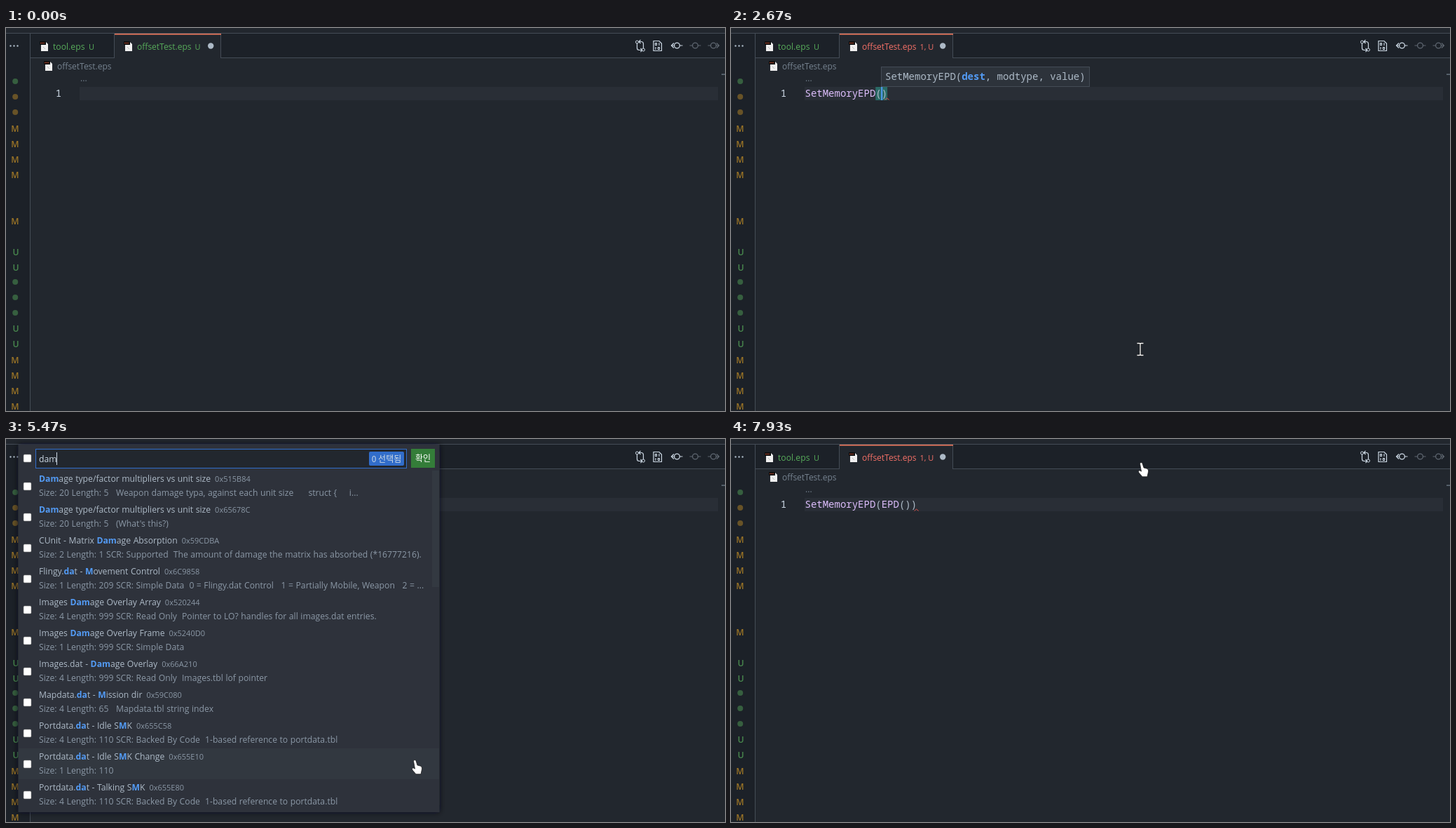
Animation, 1026 px wide and 546 px high, one loop 8000 ms. Source, as an HTML page:

```html
<!DOCTYPE html>
<html lang="en">
<head>
<meta charset="utf-8">
<title>Editor offset picker</title>
<style>
html, body { margin: 0; width: 100%; height: 100%; overflow: hidden; background: #22272e; }
svg { display: block; width: 1026px; height: 546px; }
text { white-space: pre; }
.ui { font: 12.2px "Open Sans", "Noto Sans", sans-serif; word-spacing: .36px; }
.tab { font: 12px "Open Sans", "Noto Sans", sans-serif; }
.small { font: 11px "Open Sans", "Noto Sans", sans-serif; }
.kr { font: 12px "Noto Sans CJK KR", "Noto Sans CJK", "Noto Sans", sans-serif; }
.code { font: 14px "Noto Sans Mono", "DejaVu Sans Mono", monospace; }
.hit { font-weight: 700; fill: #539bf5; }
</style>
</head>
<body>
<svg id="stage" viewBox="0 0 1026 546" xmlns="http://www.w3.org/2000/svg"></svg>
<script>
const LOOP = 8000, STEP = 200 / 3;
const CODE_X = 105.5, CHAR = 8.4;
const C = {
  bg: '#22272e', side: '#1c2128', panel: '#2d333b', border: '#444c56', text: '#adbac7',
  bright: '#cdd9e5', dim: '#768390', note: '#8b98a6', blue: '#539bf5', green: '#57ab5a', red: '#e5534b',
  error: '#f47067', amber: '#c69026', purple: '#b083f0', func: '#dcbdfb'
};

const rect = (x, y, w, h, fill, more = '') =>
  `<rect x="${x}" y="${y}" width="${w}" height="${h}" fill="${fill}" ${more}/>`;
const text = (x, y, s, cls, fill, more = '') =>
  `<text x="${x}" y="${y}" class="${cls}" fill="${fill}" ${more}>${s}</text>`;
const dot = (x, y, r, fill, more = '') => `<circle cx="${x}" cy="${y}" r="${r}" fill="${fill}" ${more}/>`;
const line = (d, color, w = 1, more = '') =>
  `<path d="${d}" fill="none" stroke="${color}" stroke-width="${w}" ${more}/>`;
const frame = (x, y, w, h, fill, stroke) => rect(x + .5, y + .5, w - 1, h - 1, fill, `stroke="${stroke}"`);
const at = (steps, t) => steps.filter(s => s[0] <= t).pop()[1];
// Text between asterisks is highlighted.
const mark = s => s.split('*').map((p, i) => i % 2 ? `<tspan class="hit">${p}</tspan>` : p).join('');

const typed = [
  [0, ''], [800, 'S'], [930, 'Se'], [1000, 'Set'], [1130, 'Setm'], [1200, 'Setme'], [1270, 'Setmem'],
  [1400, 'Setmemo'], [1470, 'Setmemor'], [1600, 'Setmemory'], [2200, 'SetMemoryEPD'],
  [2470, 'SetMemoryEPD()'], [2930, 'SetMemoryEPD(E)'], [3070, 'SetMemoryEPD(EP)'],
  [3200, 'SetMemoryEPD(EPD)'], [3330, 'SetMemoryEPD(EPD())']
];
const query = [[0, ''], [5330, 'd'], [5400, 'da'], [5470, 'dam'], [5530, 'dama'], [5670, 'damag'], [5730, 'damage']];
const errors = [[0, 0], [930, 2], [2330, 1]];
const caretOn = [[0, 0], [270, 1], [3800, 0], [4330, 1], [4470, 0]];
const inputCaret = [[0, 0], [4530, 1], [5070, 0], [5330, 1], [6270, 0], [6800, 1], [6930, 0]];
const mouse = [
  [200, 598, 497], [470, 584, 458], [6200, 584, 458], [6470, 330, 339],
  [6730, 30, 332], [7000, 30, 332], [7800, 586, 34], [8000, 586, 34]
];

const setNames = ['SetMemory', 'SetMemoryEPD', 'SetMemoryX', 'SetMemoryXEPD', 'SetDeaths', 'SetSwitch',
  'SetResources', 'SetScore', 'SetInvincibility', 'SetAllianceStatus', 'SetDoodadState', 'SetNextPtr'];
const epdNames = ['EPD', 'EPDOffsetMap', 'EPDCUnitMap', 'EUDArray', 'EUDVariable', 'EUDVArray', 'EUDLoopUnit',
  'EUDLoopList', 'EUDLoopPlayer', 'EUDByteReader', 'EUDByteWriter', 'EncodeUnit'];

const simple = 'SCR: Simple Data';
const damage = [
  ['*Dam*age type/factor multipliers vs unit size', '515B84', 'Size: 20 Length: 5   Weapon damage typa, against each unit size      struct {     i...'],
  ['*Dam*age type/factor multipliers vs unit size', '65678C', "Size: 20 Length: 5   (What's this?)"],
  ['CUnit - Matrix *Dam*age Absorption', '59CDBA', 'Size: 2 Length: 1 SCR: Supported  The amount of damage the matrix has absorbed (*16777216).'],
  ['Images *Dam*age Overlay Array', '520244', 'Size: 4 Length: 999 SCR: Read Only  Pointer to LO? handles for all images.dat entries.'],
  ['Images *Dam*age Overlay Frame', '5240D0', `Size: 1 Length: 999 ${simple}`],
  ['Images.dat - *Dam*age Overlay', '66A210', 'Size: 4 Length: 999 SCR: Read Only  Images.tbl lof pointer']
];
const backed = 'Size: 4 Length: 110 SCR: Backed By Code  1-based reference to portdata.tbl';
const damList = [
  ...damage.slice(0, 3),
  ['Flingy.*da*t - *M*ovement Control', '6C9858', `Size: 1 Length: 209 ${simple}  0 = Flingy.dat Control   1 = Partially Mobile, Weapon   2 = ...`],
  ...damage.slice(3),
  ['Mapdata.*da*t - *M*ission dir', '59C080', 'Size: 4 Length: 65   Mapdata.tbl string index'],
  ['Portdata.*da*t - Idle S*M*K', '655C58', backed],
  ['Portdata.*da*t - Idle S*M*K Change', '655E10', 'Size: 1 Length: 110'],
  ['Portdata.*da*t - Talking S*M*K', '655E80', backed]
];
const damageList = [
  ...damage.map(([label, ...rest]) => [label.replace('*Dam*age', '*Damage*'), ...rest]),
  ['Weapons.dat - *Damage* Amount', '656EB0', `Size: 2 Length: 130 ${simple}`],
  ['Weapons.dat - *Damage* Factor', '6564E0', `Size: 1 Length: 130 ${simple}`],
  ['Weapons.dat - *Damage* Type', '657258', `Size: 1 Length: 130 ${simple}  0 = Independent   1 = Explosive   2 = Concussive   3 = Nor...`]
];
const fullList = ['Active Tileset', 'Alliance Table', 'Button Set Table', 'Cheat Flags', 'Countdown Timer',
  'CUnit - Build Queue', 'CUnit - Current Order', 'CUnit - Hit Points', 'CUnit - Position', 'Elapsed Time', 'Flingy.dat - Top Speed']
  .map((name, i) => [name, (0x57F0B4 + i * 2316).toString(16).toUpperCase(), `Size: ${i % 3 ? 4 : 2} Length: ${i % 4 ? 1 : 12} ${simple}`]);

function fileIcon(x, y) {
  return `<path d="M${x + 2} ${y + 1}h7l3 3v10h-10z" fill="#f0f0f0"/>` +
    rect(x, y, 9, 5, '#0d0d0d') + line(`M${x + 1} ${y + 2.5}h6`, '#a8442c', 1.6, 'stroke-dasharray="1.5 .7"') +
    line(`M${x + 5} ${y + 8}l3 3`, '#bbb');
}

function commitIcon(x, side, color) {
  const arrow = side < 0 ? `M${x - 4.5} 21.5l-3.5 3.5 3.5 3.5` : side > 0 ? `M${x + 4.5} 21.5l3.5 3.5-3.5 3.5` : '';
  return `<circle cx="${x}" cy="25" r="3.9" fill="none" stroke="${color}" stroke-width="1.3"/>` +
    line(`M${x - 8} 25h4M${x + 4} 25h4${arrow}`, color, 1.2);
}

function toolbar() {
  const c = C.bright;
  return line('M900.5 21v7.5q0 3 3 3h4m-2-2.5l2.5 2.5-2.5 2.5M909.5 30v-7.5q0-3-3-3h-3m2-2.5l-2.5 2.5 2.5 2.5', c, 1.2) +
    dot(900.5, 20, 2, C.side, `stroke="${c}"`) + dot(909.5, 31, 2, C.side, `stroke="${c}"`) +
    line('M924 18.5h8l3.5 3.5v10.5h-11.5z', c, 1.2) +
    line('M926.5 21.5h2v3h-2zM932 21v4M927 27v4M930.5 27.5h2v3h-2z', c, 1.1) +
    commitIcon(957.5, -1, c) + commitIcon(983.5, 0, '#5f6771') + commitIcon(1009.5, 1, '#5f6771');
}

function sidebar() {
  const dots = [[76, C.green], [98, C.amber], [120, C.amber], [362, C.green], [384, C.green], [406, C.green]];
  const letter = (s, color) => y => text(18.6, y + 4.5, s, 'ui', color, 'text-anchor="end" opacity=".75" style="font-weight:600"');
  return rect(0, 8, 35, 538, C.side) + [6.5, 11.5, 16.5].map(x => dot(x, 25.5, 1.2, C.text)).join('') +
    dots.map(([y, c]) => dot(13.2, y, 4, c, 'opacity=".45"')).join('') +
    [143, 165, 187, 209, 275, 473, 495, 517, 539].map(letter('M', C.amber)).join('') +
    [319, 341, 428, 450].map(letter('U', C.green)).join('');
}

function tabs(count) {
  const right = [307, 317, 319][count], color = count ? C.error : C.green;
  return rect(35, 8, 991, 35, C.side) + rect(35, 42, 991, 1, C.border) + rect(0, 7, 1026, 1, C.border) +
    rect(155, 8, right - 155, 35, C.bg) + rect(154, 8, 1, 35, C.border) + rect(right - 1, 8, 1, 35, C.border) +
    rect(155, 8, right - 155, 1.6, '#ec775c') + rect(34, 8, 1, 538, C.border) +
    fileIcon(48, 19) + text(67, 30.5, 'tool.eps', 'ui', C.green) + text(118, 30.5, 'U', 'small', C.green) +
    fileIcon(168, 19) + text(187, 30.5, 'offsetTest.eps', 'tab', color) +
    text(269.5, 30.5, count ? `${count}, U` : 'U', 'small', color) + dot(right - 14.8, 25.5, 4.2, C.text) +
    fileIcon(54, 47) + text(73, 59, 'offsetTest.eps', 'tab', C.dim);
}

function squiggle(x, y, w) {
  let d = `M${x} ${y}`;
  for (let i = 1; i * 3 <= w; i++) d += `L${x + i * 3} ${y - (i % 2 ? 2.5 : 0)}`;
  return line(d, C.red, 1);
}

function cube(x, y, color) {
  return line(`M${x} ${y - 6}l5.5 2.8v6.4l-5.5 2.8-5.5-2.8v-6.4zM${x - 5.5} ${y - 3.2}l5.5 2.8 5.5-2.8M${x} ${y - .4}v6`, color, 1.1);
}

function suggest(x, y, names, hitLen, selected, showDoc) {
  const out = [frame(x, y, 432, names.length * 19 + 3, C.panel, C.border)];
  names.forEach((name, i) => {
    const mid = y + 10.5 + i * 18.9;
    if (i === selected) out.push(rect(x + 1, mid - 9.5, 430, 19, C.border));
    out.push(cube(x + 11, mid, i === selected ? C.bright : C.purple));
    out.push(text(x + 23, mid + 4.5, mark(`*${name.slice(0, hitLen)}*${name.slice(hitLen)}`), 'code', C.text));
  });
  if (showDoc) {
    const args = names[selected].startsWith('EPD') ? 'ptr' : 'dest, modtype, value';
    const doc = `function ${names[selected]}(${args}): undefined`;
    out.push(frame(x + 431, y, 332, 55, C.panel, C.border));
    [0, 1].forEach(i => out.push(text(x + 436.5, y + 19 + i * 19, doc.slice(i * 35, i * 35 + 35), 'code', C.note)));
    out.push(line(`M${x + 746} ${y + 11}l7 7m0-7l-7 7`, C.text, 1.1));
  }
  return out.join('');
}

function editor(t) {
  const code = at(typed, t), col = code.replace(/\)+$/, '').length;
  const top = t >= 870 && t < 2000 ? 65 : 84;
  const colX = n => CODE_X + n * CHAR, caretX = colX(col);
  const word = t >= 870 && t < 2200, active = t < 4470;
  const out = [rect(105, top, 911, 19, '#292e36'), text(70.8, top + 14, '1', 'code', C.bright)];
  if (top === 84) out.push(text(106, 76, '...', 'tab', C.dim));
  if (active && code[col - 1] === '(')
    out.push(rect(colX(col - 1), top, CHAR * 2, 19, '#2a6a66'));
  const parts = code.split(/([()])/).map(p => `<tspan fill="${'()'.includes(p) || t < 2200 ? C.text : C.func}">${p}</tspan>`);
  out.push(text(CODE_X, top + 14, parts.join(''), 'code', C.text));
  if (t >= 930 && t < 2200) out.push(squiggle(CODE_X, top + 18, code.length * CHAR));
  else if (t >= 2530) out.push(squiggle(colX(code.length) - 3.5, top + 18.5, 7));
  out.push(rect(1021, 65.5, 5, 1.2, t >= 930 && t < 2330 ? C.red : C.dim));
  if (at(caretOn, t)) out.push(rect(caretX - .5, top, 2, 19, C.blue));

  if (word) {
    const names = setNames.filter(n => n.toLowerCase().startsWith(code.toLowerCase()));
    out.push(suggest(Math.round(caretX), top + 19, names, code.length, t >= 1930 ? 1 : 0, t >= 1800));
  } else if (t >= 3000 && t < 3330) {
    const part = code.slice(13, col);
    out.push(suggest(Math.round(caretX), 103, epdNames.filter(n => n.startsWith(part)), part.length, 0, t >= 3270));
  }
  if (t >= 2670 && t < 2930 || t >= 3470 && active) {
    const x = Math.round(caretX) - (col > 13 ? 0 : 1);
    out.push(frame(x, 55, 298, 29, C.panel, C.border));
    out.push(text(x + 6, 74, mark('SetMemoryEPD(*dest*, modtype, value)'), 'code', C.text));
  }
  return out.join('');
}

function checkbox(y, on) {
  return rect(25, y, 11, 11, on ? '#0075ff' : '#fff', `rx="1.5" stroke="${on ? '#0075ff' : '#767676'}" stroke-width=".6"`) +
    (on ? line(`M27.5 ${y + 5.5}l2.2 2.5 4-5`, '#fff', 1.6) : '');
}

const rowsAt = t => t < 5330 ? fullList : t < 5530 ? damList : damageList;

function picker(t, m) {
  if (t < 4470 || t >= 7930) return '';
  const rows = t < 4530 ? [] : rowsAt(t), q = at(query, t), done = t >= 6930;
  const h = rows.length ? rows.length * 44 + (rows.length > 10 ? 40 : 39) : 40;
  const hover = m.hand && m.y >= 45 ? Math.floor((m.y - 45) / 44) : -1;
  const out = [
    rect(17.5, 8, 601, h, C.panel, 'filter="url(#shadow)"'),
    frame(42, 14, 530, 28, C.bg, done ? C.border : '#316dca'),
    checkbox(22, false),
    text(47, 33, q, 'ui', C.bright),
    rect(518, 18, 50, 20, '#316dca', 'rx="2"'),
    text(543, 32.5, `${done ? 1 : 0} 선택됨`, 'kr', C.bright, 'text-anchor="middle"'),
    rect(578, 14, 34, 27, m.hand && m.y < 42 ? '#46954a' : '#347d39'),
    text(595, 32, '확인', 'kr', '#fff', 'text-anchor="middle"')
  ];
  if (at(inputCaret, t)) {
    const widths = { d: .613, a: .556, m: .93, g: .548, e: .561 };
    const w = [...q].reduce((sum, ch) => sum + widths[ch] * 12.2, 0);
    out.push(rect(Math.floor(47 + w), 19, 1, 18, C.bright));
  }
  rows.forEach(([label, addr, detail], i) => {
    const y = 45 + i * 44;
    if (i === hover) out.push(rect(18, y, 600, 44, '#323840'));
    out.push(checkbox(y + 17, done && i === 6));
    out.push(text(47, y + 16.3, `${mark(label)}<tspan class="small" fill="${C.note}" dx="6">0x${addr}</tspan>`, 'ui', C.text));
    out.push(text(47, y + 36.3, detail, 'ui', C.note));
  });
  if (rows.length > 10) out.push(rect(608, 45, 10, 166, '#3a414a', 'opacity=".45"'));
  return out.join('');
}

function pointerAt(t) {
  const i = Math.max(1, mouse.findIndex(k => k[0] > t));
  const [a, b] = [mouse[i - 1], mouse[i]];
  const p = Math.max(0, (t - a[0]) / (b[0] - a[0]));
  const x = a[1] + (b[1] - a[1]) * p, y = a[2] + (b[2] - a[2]) * p;
  const hand = t >= 4530 && t < 5800 || t >= 6270 && y < 444;
  return { x, y, hand };
}

function pointer(t, m) {
  if (t < 200) return '';
  const move = `transform="translate(${m.x.toFixed(1)} ${m.y.toFixed(1)})"`;
  if (m.hand) return `<path ${move} d="M-2.500 1Q-1.500-1.500 .8 0L3 7 7.500 8.200Q10 9.200 9.700 12L8 19.800H1L-4 14Q-5.500 10.800-2.500 11L-.5 12.200Z" fill="#fff" stroke="#111" stroke-width=".7"/>`;
  const beam = 'M-4.5-8.5h3.5q1 0 1 1 0-1 1-1h3.5M-4.5 8.5h3.5q1 0 1-1 0 1 1 1h3.5M0-8v16';
  return line(beam, '#111', 2.6, move) + line(beam, '#fff', 1.3, move);
}

const defs = '<defs><filter id="shadow" x="-5%" y="-10%" width="110%" height="120%">' +
  '<feDropShadow dx="0" dy="0" stdDeviation="4" flood-color="#0d1117" flood-opacity=".8"/></filter></defs>';
const stage = document.getElementById('stage');
let shown = -1;

function render(ms) {
  const t = Math.round(Math.floor((ms % LOOP + 5) / STEP) * STEP / 10) * 10 % LOOP;
  if (t === shown) return;
  shown = t;
  const m = pointerAt(t);
  stage.innerHTML = defs + rect(0, 0, 1026, 546, C.bg) + sidebar() + tabs(at(errors, t)) +
    toolbar() + editor(t) + picker(t, m) + pointer(t, m);
}

const start = performance.now();
function tick() {
  render(performance.now() - start);
  requestAnimationFrame(tick);
}
tick();
</script>
</body>
</html>
```
